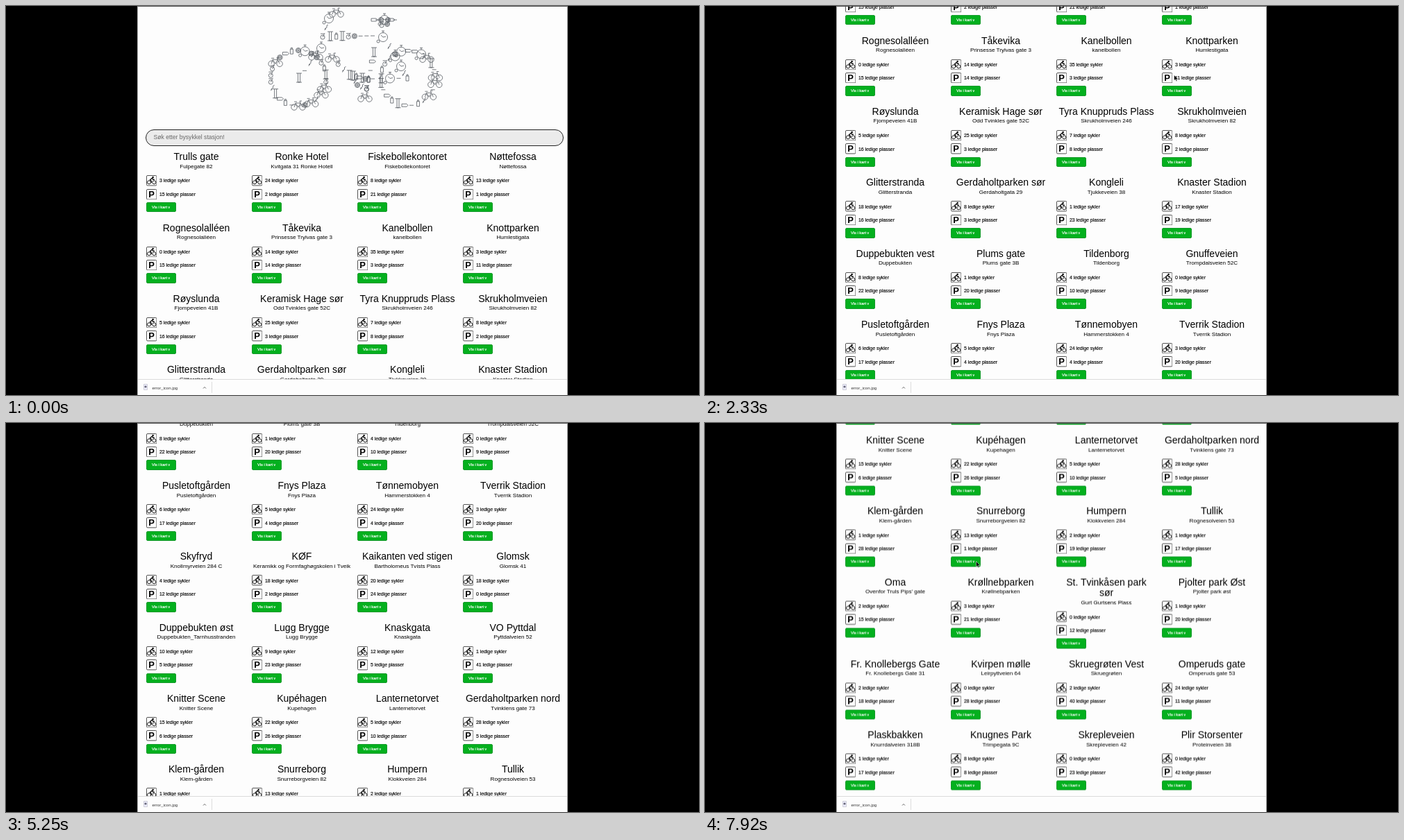
An HTML page for the animation above (8 s loop, 998 by 561 pixels).

```html
<!DOCTYPE html>
<html lang="no">
<head>
<meta charset="utf-8">
<title>Bysykkel</title>
<style>
html, body { margin: 0; width: 100%; height: 100%; overflow: hidden; background: #000; }
body { position: relative; font-family: "Liberation Sans", Arial, sans-serif; color: #000; }
#page { position: absolute; left: 189px; top: 0; width: 620px; height: 538px; overflow: hidden; background: #fdfdfd; }
/* Children of #content use stage coordinates. */
#content { position: absolute; left: -189px; top: 0; width: 998px; height: 1600px; will-change: transform; }
#hero { position: absolute; left: 0; top: 0; fill: none; stroke: #555a60; stroke-width: .8; }
#search { position: absolute; left: 201px; top: 177.5px; width: 602px; height: 24px; box-sizing: border-box;
  border: 1.4px solid #222; border-radius: 12px; background: #ebebeb; color: #686868;
  font-size: 8.6px; line-height: 21.5px; padding-left: 10.5px; }
.station { position: absolute; width: 145px; white-space: nowrap; }
.station h2 { margin: 0; text-align: center; font-size: 14px; font-weight: normal; line-height: 15.6px; }
.station p { margin: -1px 0 5px; text-align: center; font-size: 8.1px; line-height: 13px; }
.fact { height: 15.4px; margin-bottom: 4px; display: flex; align-items: center; gap: 4px; font-size: 6.9px;
  -webkit-text-stroke: .15px; }
.fact svg { width: 15.4px; height: 15.4px; flex: none; -webkit-text-stroke: 0; }
.button { width: 43px; height: 14.4px; box-sizing: border-box; border: .7px solid #159a2c; border-radius: 2px;
  background: #04b01e; color: #fff; font-size: 5.8px; line-height: 13px; text-align: center;
  -webkit-text-stroke: .2px; }
.button small { font-size: 5px; }
#bar { position: absolute; left: 189px; top: 538px; width: 620px; height: 23px; background: #fdfdfd;
  box-sizing: border-box; border-top: 1px solid #dcdcdc; font-size: 6px; color: #333; }
#bar span { position: absolute; left: 21.5px; top: 8px; line-height: 8px; }
#bar svg { position: absolute; left: 0; top: 0; }
#edge { position: absolute; left: 189px; top: 0; width: 620px; height: 561px; box-sizing: border-box;
  border: solid #aaa; border-width: 1px 1px 0; border-top-color: #555; }
#cursor { position: absolute; left: 0; top: 0; }
</style>
</head>
<body>
<div id="page"><div id="content">
  <svg id="hero" width="998" height="170"></svg>
  <div id="search">Søk etter bysykkel stasjon!</div>
</div></div>
<div id="bar">
  <svg width="120" height="22" fill="none">
    <path d="M9.5 6.500h5v8h-5z" fill="#eef" stroke="#b5b5c0" stroke-width=".6"/>
    <circle cx="12" cy="10" r="1.6" fill="#667"/>
    <path d="M95 12.500l2-2 2 2" stroke="#555" stroke-width=".9"/>
    <path d="M107.500 3v16" stroke="#dcdcdc"/>
  </svg>
  <span>error_icon.jpg</span>
</div>
<div id="edge"></div>
<svg id="cursor" width="10" height="12"><path d="M.5.5v8l1.900-1.700 1.300 2.700 1.300-.6-1.300-2.600h2.500z" fill="#000" stroke="#fff" stroke-width=".5"/></svg>

<script>
const $ = id => document.getElementById(id);

// name | address (empty: same as name) | bikes | places
const stations = `Trulls gate|Fulpegate 82|3|15
Ronke Hotel|Kvitgata 31 Ronke Hotell|24|2
Fiskebollekontoret||8|21
Nøttefossa||13|1
Rognesolalléen||0|15
Tåkevika|Prinsesse Trylvas gate 3|14|14
Kanelbollen|kanelbollen|35|3
Knottparken|Humlestigata|3|11
Røyslunda|Fjompeveien 41B|5|16
Keramisk Hage sør|Odd Tvinkles gate 52C|25|3
Tyra Knuppruds Plass|Skrukholmveien 246|7|8
Skrukholmveien|Skrukholmveien 82|8|2
Glitterstranda||18|16
Gerdaholtparken sør|Gerdaholtgata 29|8|3
Kongleli|Tjukkeveien 38|1|23
Knaster Stadion||17|19
Duppebukten vest|Duppebukten|8|22
Plums gate|Plums gate 3B|1|20
Tildenborg||4|10
Gnuffeveien|Trompdalsveien 52C|0|9
Pusletoftgården||6|17
Fnys Plaza||5|4
Tønnemobyen|Hammerstokken 4|24|4
Tverrik Stadion||3|20
Skyfryd|Knollmyrveien 284 C|4|12
KØF|Keramikk og Formfaghøgskolen i Tveik|18|2
Kaikanten ved stigen|Bartholomeus Tvists Plass|20|24
Glomsk|Glomsk 41|18|0
Duppebukten øst|Duppebukten_Tarnhusstranden|10|5
Lugg Brygge||9|23
Knaskgata||12|5
VO Pyttdal|Pyttdalveien 52|1|41
Knitter Scene||15|6
Kupéhagen|Kupehagen|22|26
Lanternetorvet||5|10
Gerdaholtparken nord|Tvinklens gate 73|28|5
Klem-gården||1|28
Snurreborg|Snurreborgveien 82|13|1
Humpern|Klokkveien 284|2|19
Tullik|Rognesolveien 53|1|17
Oma|Ovenfor Truls Pips' gate|2|15
Krøllnebparken||3|21
St. Tvinkåsen park<br>sør|Gurt Gurtsens Plass|0|12
Pjolter park Øst|Pjolter park øst|1|20
Fr. Knollebergs Gate|Fr. Knollebergs Gate 31|2|18
Kvirpen mølle|Leirpyttveien 64|0|28
Skruegrøten Vest|Skruegrøten|2|40
Omperuds gate|Omperuds gate 53|24|11
Plaskbakken|Knurrdalveien 318B|1|17
Knugnes Park|Trimpegata 9C|8|8
Skrepleveien|Skrepleveien 42|0|23
Plir Storsenter|Proteinveien 38|0|42`.split("\n").map(line => line.split("|"));

const icon = inner => `<svg viewBox="0 0 16 16"><rect x=".5" y=".5" width="15" height="15" rx="1.500"
  fill="#fff" stroke="#333" stroke-width=".9"/>${inner}</svg>`;
const bikeIcon = icon(`<g fill="none" stroke="#111"><circle cx="4.200" cy="10.700" r="2.600"/><circle cx="11.800" cy="10.700" r="2.600"/>
  <path d="M7.500 11.500V8.700L5.600 7l3-2.700 1.700 2.200h2" stroke-width="1.400"/></g><circle cx="10" cy="3" r="1.300"/>`);
const parkIcon = icon(`<text x="8" y="12.800" text-anchor="middle" font-size="13.500" font-weight="bold">P</text>`);

const wrapRow = 10;
const cells = stations.map(([name, address, bikes, places], i) => {
  const row = Math.floor(i / 4), left = 201.5 + 152 * (i % 4);
  const top = 210.2 + 102.35 * row + (row > wrapRow ? 15.6 : 0);
  return `<div class="station" style="left:${left}px;top:${top}px"><h2>${name}</h2><p>${address || name}</p>
    <div class="fact" style="margin-top:6.500px">${bikeIcon}${bikes} ledige sykler</div>
    <div class="fact">${parkIcon}${places} ledige plasser</div>
    <div class="button">Vis i kart <small>v</small></div></div>`;
});
$("content").insertAdjacentHTML("beforeend", cells.join(""));

// The hero is a bicycle assembled from small bicycle parts.
const ring = (x, y, r) => `M${x - r} ${y}a${r} ${r} 0 1 0 ${2 * r} 0a${r} ${r} 0 1 0 ${-2 * r} 0`;
const parts = {
  b: ring(-6, 2, 4.2) + ring(6, 2, 4.2) + "M-6 2l2-6h7l3 6M-4-4l4 6 3-6M-6-6h4M3-4l-1-3h3",
  c: ring(0, 0, 6.5) + ring(-7, 6, 2) + "M-3-3l3 3 4-1M0-6v-3M-2-9h4",
  r: ring(0, 0, 3.6) + ring(0, 0, 2.4) + ring(0, 0, 1),
  k: ring(0, 1, 3) + "M0 1l3-6M-3-4h5",
  o: "M-2-3h4v7h-4zM-1-3v-2h2v2",
  p: "M-4-7h8M-1.500-7v13h3v-13M-4 6h8",
  l: "M-4-2h7l2 2-2 2h-7z",
  d: "M-3 0h6",
  z: "M-2 4l1-3 2-1 0-3 2-1M-2 2l2 0"
};
const part = (key, x, y) => `<path d="${parts[key]}" transform="translate(${x.toFixed(1)} ${y.toFixed(1)})"/>`;
const along = (keys, x0, y0, x1, y1) => [...keys].map((key, i) => {
  const p = keys.length > 1 ? i / (keys.length - 1) : 0;
  return part(key, x0 + (x1 - x0) * p, y0 + (y1 - y0) * p);
}).join("");
const wheel = (keys, cx, cy, r) => [...keys].map((key, i) => {
  const angle = i / keys.length * 2 * Math.PI;
  return part(key, cx + r * Math.sin(angle), cy - r * Math.cos(angle));
}).join("");

$("hero").innerHTML =
  wheel("rcrrkopkbbzbrbdolpzkkkbrlo", 421, 104, 40) +
  wheel("llcbpdbbdbzodlpoldpzokzrc", 579, 104, 39.5) +
  along("cb", 465, 18, 476, 10) + along("zk", 461, 31, 456, 44) +
  along("popkrddd", 467, 44, 528, 43) + part("c", 543, 45) +
  along("ldrcrld", 530, 20, 560, 20) + along("kr", 541, 27, 549, 26) +
  along("cbzdp", 454, 61, 422, 104) +
  along("bkzpz", 470, 75, 503, 108) + along("pldokb", 530, 67, 517, 132) +
  along("polpro", 500, 101, 522, 106) + along("rzk", 506, 114, 519, 119) +
  along("dpcdo", 528, 105, 578, 104) + along("zcc", 552, 58, 569, 87) + part("z", 573, 97);

// Motion runs at 12 steps a second. Keyframes: [step, values, ease-out power]
const STEPS = 96, STEP_MS = 1000 / 12;
const scrollKeys = [[0, [0]], [16, [0]], [19, [54]], [28, [270]], [36, [334], 3], [58, [334]],
  [64, [700]], [66, [700]], [68, [827]], [77, [1011.5], 3], [STEPS, [1011.5]]];
const enterKeys = [[1, [727, 527]], [6, [621, 125], 2], [19, [621, 125]], [28, [675, 99]], [36, [675, 99]]];
const leaveKeys = [[86, [529, 30]], [95, [390, 199], 2], [STEPS, [390, 199]]];

function sample(keys, step) {
  const next = keys.findIndex(key => key[0] > step);
  if (next < 1) return null;
  const [s0, from] = keys[next - 1], [s1, to, power = 1] = keys[next];
  const p = 1 - (1 - (step - s0) / (s1 - s0)) ** power;
  return from.map((v, i) => v + (to[i] - v) * p);
}

const start = performance.now();
function draw() {
  // The small lead absorbs timer rounding at step boundaries.
  const step = Math.floor((performance.now() - start + 4) / STEP_MS) % STEPS;
  $("content").style.transform = `translateY(${-sample(scrollKeys, step)[0]}px)`;
  const pointer = sample(enterKeys, step) || sample(leaveKeys, step);
  $("cursor").style.display = pointer ? "" : "none";
  if (pointer) $("cursor").style.transform = `translate(${pointer[0]}px, ${pointer[1]}px)`;
  requestAnimationFrame(draw);
}
draw();
</script>
</body>
</html>
```
